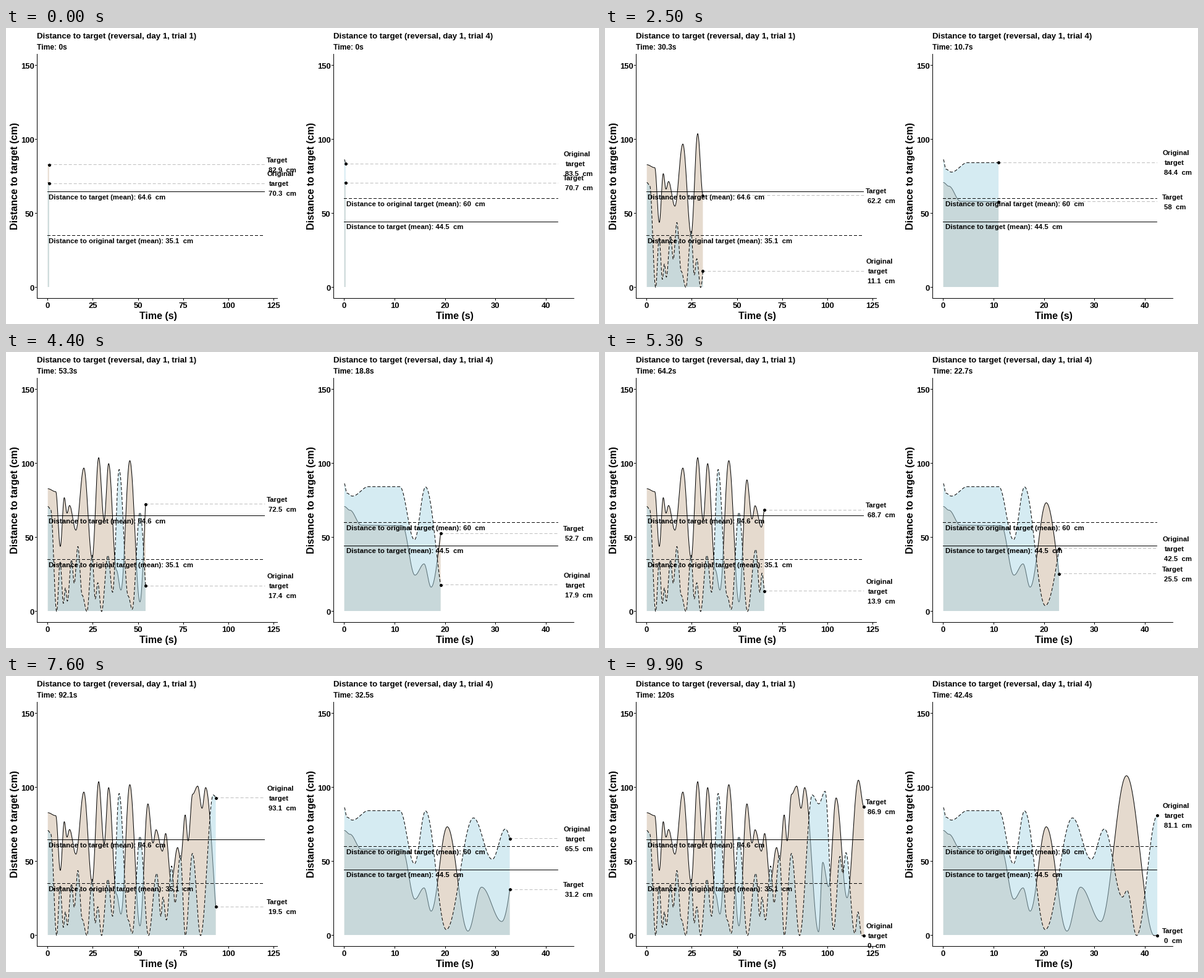
A matplotlib script that plays this animation: 960 by 480 pixels, repeating every 10000 ms.

```python
import numpy as np
import matplotlib.pyplot as plt
from matplotlib.animation import FuncAnimation

W, H, DPI = 960, 480, 100
FRAMES, INTERVAL = 100, 100
PX = 72 / DPI
Y0, Y_SCALE = 420.9, 2.4
DASH = (0, (5, 3))

plt.rcParams["font.family"] = "Liberation Sans"
plt.rcParams["font.weight"] = "bold"

# Turns of each path as (seconds, cm); the distance eases from one to the next.
TARGET_1 = [
    (0, 83), (4.4, 81), (6.9, 44), (9.1, 77), (10.6, 66.5), (12, 71.7),
    (15.5, 55), (19.9, 97), (24.5, 36), (28.1, 104), (31.1, 62), (33.6, 100),
    (37.9, 28), (40.4, 14.5), (45.3, 102), (50.9, 6.5), (55.3, 89),
    (58.1, 62.5), (59.8, 71.5), (63.3, 57), (65.1, 69), (68.2, 36.5),
    (71.7, 59.5), (73.4, 51.5), (75.9, 81.5), (77.5, 64), (80, 95.5),
    (82.8, 101), (85.2, 86), (87.2, 100), (94.9, 2.5), (97.2, 49.5),
    (100.4, 33), (104.6, 93), (110.6, 25.5), (116.9, 105), (120, 86.9)]
ORIGINAL_1 = [
    (0, 71), (1.6, 69), (4.9, 0), (6.8, 34), (8.6, 5.5), (9.7, 16), (10.8, 7),
    (13.1, 35), (14.6, 19), (16.6, 44), (19, 11), (21.6, 0), (24.5, 38),
    (26.2, 8.5), (27.6, 19.5), (29.7, 0), (33.2, 38), (35.8, 13), (39.4, 96),
    (44.4, 10.5), (46.6, 1.5), (50.9, 67), (55.6, 0), (60.2, 42), (62.5, 13),
    (63.6, 26), (65.5, 10.5), (68.4, 47), (70.3, 22), (73.2, 54), (76, 0),
    (79.9, 55.5), (84.4, 0), (91.4, 95), (95, 89), (98.5, 97.5), (103.2, 4),
    (106.7, 53.5), (108.3, 42), (110, 56), (114.9, 1.5), (116.7, 16),
    (118.6, 0), (120, 0)]
TARGET_4 = [
    (0, 71), (1.1, 68.5), (3.4, 58.3), (11.5, 58), (14, 24.6), (15.8, 32.2),
    (17.2, 16.5), (20.4, 73.5), (24.5, 3), (27.2, 32.7), (31.2, 9.5),
    (36.3, 108), (41.8, 0), (42.4, 0)]
ORIGINAL_4 = [
    (0, 86.5), (0.5, 80), (1.6, 78), (4.8, 84.4), (11, 84.4), (13.9, 48.5),
    (16.1, 84.2), (20.2, 4), (25.6, 79.5), (29.3, 51.5), (31.9, 72),
    (35.5, 26), (36.4, 30.5), (38.3, 0), (42.4, 81.1)]


def eased(turns):
    x, y = np.array(turns, float).T

    def value(t):
        i = np.clip(np.searchsorted(x, t, side="right") - 1, 0, len(x) - 2)
        u = (t - x[i]) / (x[i + 1] - x[i])
        return y[i] + (y[i + 1] - y[i]) * (1 - np.cos(np.pi * u)) / 2

    return value


def number(v):
    return f"{abs(round(float(v), 1)):g}"


def py(v):
    return Y0 - Y_SCALE * v


def centre(v):
    """Middle of the pixel that holds v, so thin rules stay sharp."""
    return np.floor(v) + 0.5


fig = plt.figure(figsize=(W / DPI, H / DPI), dpi=DPI, facecolor="white")
ax = fig.add_axes([0, 0, 1, 1])
ax.set(xlim=(0, W), ylim=(H, 0))
ax.axis("off")


def write(x, y, text, px, **kw):
    return ax.text(x, y, text, fontsize=px * PX, color="black", zorder=6,
                   **{"va": "baseline", **kw})


def stroke(x, y, color="black", style="-", z=5):
    return ax.plot(x, y, color=color, ls=style, lw=PX, zorder=z, snap=False,
                   dash_capstyle="butt", solid_capstyle="butt")[0]


def hline(x1, x2, y, style="-"):
    stroke([np.floor(x1), np.floor(x2)], [centre(y)] * 2, style=style)


def vline(x, y1, y2):
    stroke([centre(x)] * 2, [y1, y2])


class Trace:
    """One filled curve with its moving dot, guide line and label."""

    def __init__(self, panel, turns, words, fill, style, z):
        self.panel, self.value = panel, eased(turns)
        self.area = ax.add_patch(plt.Polygon(
            [(0, 0), (1, 0), (1, 1)], fc=fill, alpha=0.5, lw=0, ec="none",
            zorder=z, snap=False))
        self.line = stroke([], [], style=style, z=z + 0.5)
        self.guide = stroke([], [], "#bebebe", DASH)
        self.dot = ax.plot([], [], "o", color="black", ms=5 * PX, mew=0, zorder=7)[0]
        x = panel.px(panel.span + 1)
        self.label = [write(x + (3.2 if i else 0), 0, word, 11.38)
                      for i, word in enumerate(words + [""])]

    def update(self, t):
        px, grid = self.panel.px, self.panel.grid
        ts = np.append(grid[grid < t], t)
        xs, ys = px(ts), py(self.value(ts))
        self.line.set_data(xs, ys)
        base = np.floor(Y0)
        self.area.set_xy([*zip(xs, np.minimum(ys, base)),
                          (xs[-1], base), (xs[0], base)])
        self.dot.set_data(xs[-1:], ys[-1:])
        self.guide.set_data([xs[-1], px(self.panel.span)], [centre(ys[-1])] * 2)
        self.label[-1].set_text(number(self.value(t)) + "  cm")
        middle = (len(self.label) - 1) / 2
        for i, line in enumerate(self.label):
            line.set_y(ys[-1] + 4.1 + 16 * (i - middle))


class Panel:
    def __init__(self, left, trial, span, ticks, target, original, means):
        self.left, self.span = left, span
        self.scale = 390 / 1.1 / (span + 1)
        self.grid = np.linspace(0, span, 900)
        self.frame(trial, ticks)
        self.traces = [
            Trace(self, target, ["Target"], "#cdb79e", "-", 1),
            Trace(self, original, ["Original", "target"], "#add8e6", DASH, 2)]
        for name, mean, style in zip(("target", "original target"), means, ("-", DASH)):
            hline(self.px(0), self.px(span), py(mean), style)
            write(self.px(0.5) - 0.3, py(mean) + 12.2,
                  f"Distance to {name} (mean): {number(mean)}  cm", 11.38)

    def px(self, t):
        return self.left + 17.7 + self.scale * t

    def frame(self, trial, ticks):
        x, bottom = self.left, 438
        vline(x, 42, bottom + 1)
        hline(x, x + 390, bottom)
        for v in (0, 50, 100, 150):
            hline(x - 3, x, py(v))
            write(x - 4.5, py(v) + 4.8, str(v), 13, ha="right")
        for v in ticks:
            vline(self.px(v), bottom, bottom + 4)
            write(self.px(v) - 0.5, 454, str(v), 13, ha="center")
        write(x + 0.5, 17, f"Distance to target (reversal, day 1, trial {trial})", 13.25)
        self.clock = write(x + 0.5, 35, "", 12)
        write(x + 196, 472, "Time (s)", 16, ha="center")
        write(x - 35.5, 240, "Distance to target (cm)", 16, ha="center",
              va="center", rotation=90)

    def update(self, n):
        step = self.span / (FRAMES - 1)
        self.clock.set_text(f"Time: {number(n * step)}s")
        for trace in self.traces:
            trace.update(min(self.span, (n + 0.55) * step))


panels = [
    Panel(50, 1, 120, range(0, 126, 25), TARGET_1, ORIGINAL_1, (64.6, 35.1)),
    Panel(530, 4, 42.4, range(0, 41, 10), TARGET_4, ORIGINAL_4, (44.5, 60))]


def draw(n):
    for panel in panels:
        panel.update(n)
    return []


anim = FuncAnimation(fig, draw, frames=FRAMES, interval=INTERVAL,
                     init_func=lambda: draw(0), repeat=True, repeat_delay=0)
plt.show()
```
